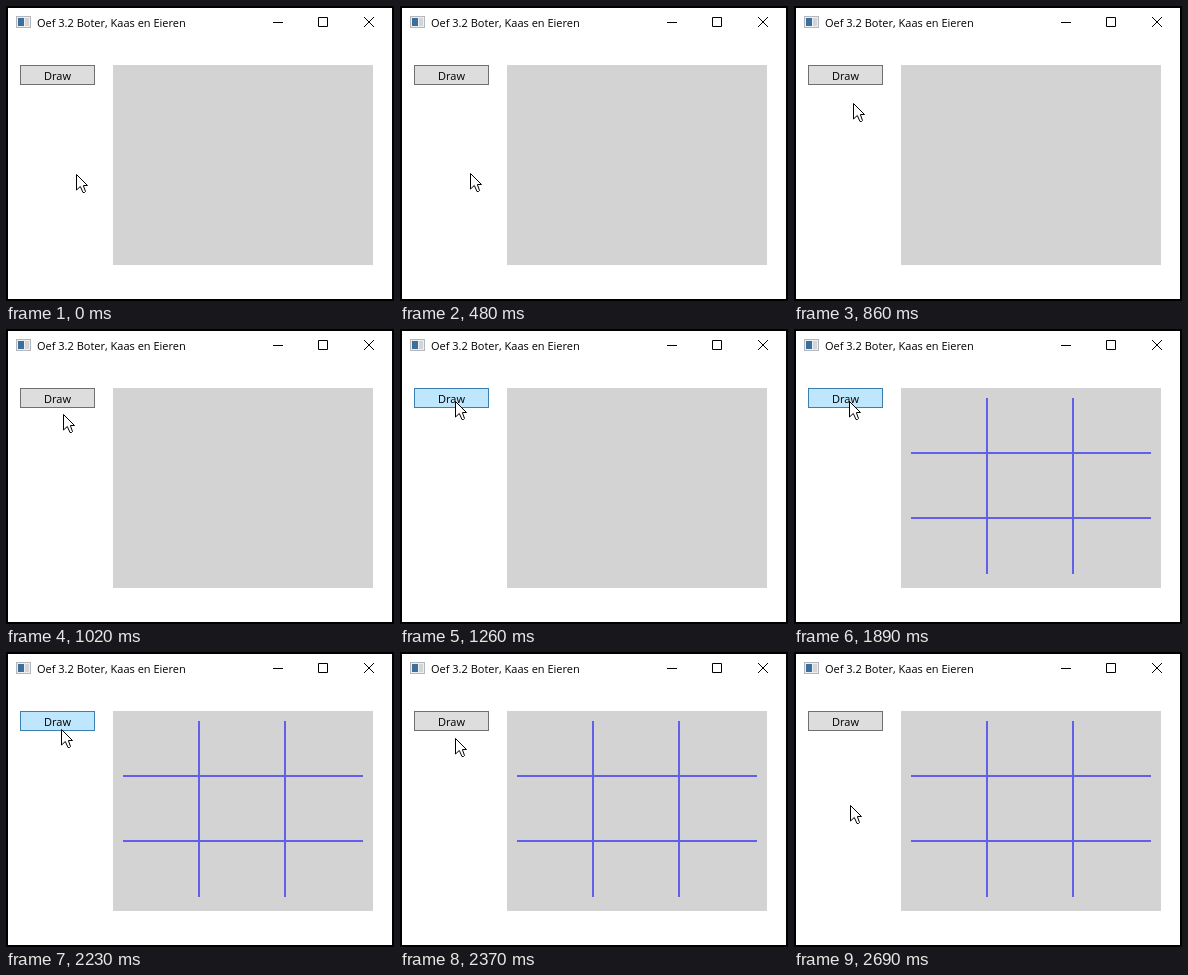
These frames come from a looping animation (388x295 px, 3.71 s). An HTML page:

```html
<!DOCTYPE html>
<html lang="nl">
<head>
<meta charset="utf-8">
<title>Boter, Kaas en Eieren</title>
<style>
  html, body { margin: 0; width: 100%; height: 100%; overflow: hidden; background: #fff; }
  svg { display: block; width: 388px; height: 295px; }
  text { font: 11px "Open Sans", "Noto Sans", sans-serif; }
  #button { fill: #ddd; stroke: #707070; }
  #button.hover { fill: #bee6fd; stroke: #3c7fb1; }
  #button.pressed { fill: #c4e5f6; stroke: #2c628b; }
</style>
</head>
<body>
<svg viewBox="0 0 388 295">
  <rect x="1" y="1" width="386" height="293" fill="#fff" stroke="#000" stroke-width="2"/>

  <!-- title bar -->
  <rect x="10.5" y="10.5" width="14" height="11" fill="#eee" stroke="#b4b8bc"/>
  <rect x="12" y="12" width="6" height="8" fill="#3d6f9e"/>
  <rect x="19" y="12" width="4" height="8" fill="#d0d6db"/>
  <text x="31" y="21">Oef 3.2 Boter, Kaas en Eieren</text>
  <path d="M267 16.5h10M312.5 11.5h9v9h-9zM358 11l10 10m0-10l-10 10" fill="none" stroke="#000" stroke-linejoin="round"/>

  <!-- content -->
  <rect x="107" y="59" width="260" height="200" fill="#d3d3d3"/>
  <path id="grid" d="M193 69V245M279 69V245M117 124H357M117 189H357" stroke="#625fe8" stroke-width="2"/>
  <rect id="button" x="14.5" y="59.5" width="74" height="19"/>
  <text x="38" y="74">Draw</text>

  <circle id="click" cx="55.5" cy="72" r="12" fill="#ff0" fill-opacity=".5"/>
  <path id="cursor" d="M.5 .5V16L4.3 12.5L7 18.5H8.5L9.5 17.5L7.5 12V11.5H11.5Z" fill="#fff" stroke="#000" stroke-linejoin="round"/>
</svg>
<script>
  const LOOP = 3710, PRESS = 1820, RELEASE = 1890;
  const STEP = 76; // ms between pointer updates

  const moves = [
    { start: 0, steps: 1, from: [70, 168], to: [70, 168] },
    { start: 480, steps: 6, from: [70, 167], to: [58, 88] },
    { start: 1020, steps: 3, from: [57, 85], to: [55, 72] },
    { start: 2230, steps: 6, from: [55, 77], to: [56, 153] }
  ];

  const [grid, button, click, cursor] =
    ["grid", "button", "click", "cursor"].map(id => document.getElementById(id));
  const show = (element, visible) =>
    element.setAttribute("visibility", visible ? "visible" : "hidden");

  // Gentle ease in and out
  const ease = p => p * (1 + 3 * p - 2 * p * p) / 2;

  function pointerAt(t) {
    const { start, steps, from, to } = moves.findLast(move => move.start <= t);
    const progress = ease(Math.min(Math.floor((t - start) / STEP) / steps, 1));
    return from.map((a, i) => Math.floor(a + (to[i] - a) * progress));
  }

  function render(now) {
    const t = now % LOOP;
    const [x, y] = pointerAt(t);
    const pressed = t >= PRESS && t < RELEASE;

    cursor.setAttribute("transform", `translate(${x} ${y})`);
    button.setAttribute("class", pressed ? "pressed" : y < 79 ? "hover" : "");
    show(click, pressed);
    show(grid, t >= RELEASE);
  }

  const start = performance.now();
  function tick() {
    render(performance.now() - start);
    requestAnimationFrame(tick);
  }
  tick();
</script>
</body>
</html>
```
